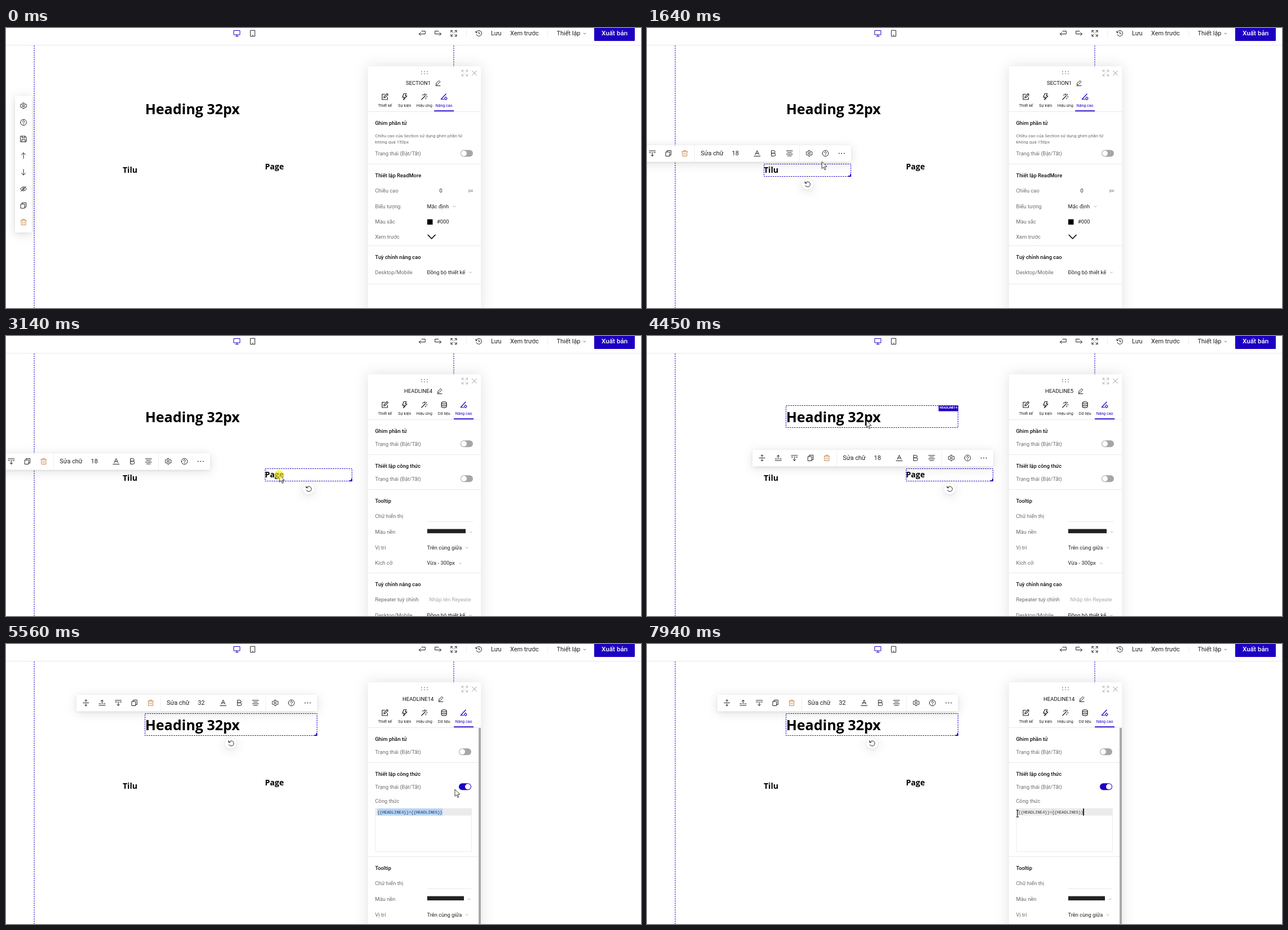
Write an HTML page that moves like this. It is 1126 px wide and 497 px high and loops after 8 s.

```html
<!DOCTYPE html>
<html lang="vi">
<head>
<meta charset="utf-8">
<title>Page builder</title>
<style>
html, body { margin: 0; width: 100%; height: 100%; overflow: hidden; background: #fff; }
svg { display: block; width: 1126px; height: 497px; font: 9.36px Roboto, sans-serif; fill: #222; }
.ico { fill: none; stroke: #222; stroke-linecap: round; stroke-linejoin: round; }
.label { fill: #6c6c6c; }
.title { font-weight: 500; fill: #111; }
.name { font-size: 9.55px; fill: #111; }
.note { font-size: 7.8px; fill: #6c6c6c; }
.tab { font-size: 7.02px; text-anchor: middle; }
.hint { fill: #aaa; }
.menu { font-size: 10.92px; }
.publish { font-size: 11.7px; font-weight: 500; fill: #fff; }
.h1 { font: 700 25px "Open Sans", sans-serif; fill: #000; }
.h2 { font: 700 14px "Open Sans", sans-serif; fill: #000; }
.tag { font-size: 5.4px; font-weight: 700; fill: #fff; text-anchor: middle; }
.code { font: 7.13px "Liberation Mono", monospace; fill: #333; }
.dash { fill: none; stroke: #1c00c2; stroke-dasharray: 2.4 1.6; }
.card { fill: #fff; filter: drop-shadow(0 1px 2px rgba(0,0,0,.08)) drop-shadow(0 3px 9px rgba(0,0,0,.12)); }
.panel { fill: #fff; filter: drop-shadow(0 0 12px rgba(0,0,0,.12)); }
</style>
</head>
<body>
<svg id="stage" viewBox="0 0 1126 497"></svg>
<script>
const LOOP = 8000, BLUE = '#1c00c2', INK = '#222', RUST = '#c98a4b', PALE = '#aaa';

const ICONS = {
  gear: 'M-1-5H1L1.5-3.4 3-2.5 4.6-3 5.6-1.3 4.4 0 5.6 1.3 4.6 3 3 2.5 1.5 3.4 1 5H-1L-1.5 3.4-3 2.5-4.6 3-5.6 1.3-4.4 0-5.6-1.3-4.6-3-3-2.5-1.5-3.4ZM-1.7 0a1.7 1.7 0 1 0 3.4 0a1.7 1.7 0 1 0-3.4 0',
  help: 'M-5.3 0a5.3 5.3 0 1 0 10.6 0a5.3 5.3 0 1 0-10.6 0M-1.7-1.2a1.7 1.7 0 1 1 2.5 1.5Q0 .7 0 1.5M0 3v.2',
  save: 'M-5-5H3L5-3V5H-5ZM-2.5-5v3h5v-3M-3 5V1H3V5',
  up: 'M0 5V-5M-3.5-1.5 0-5 3.5-1.5',
  down: 'M0-5V5M-3.5 1.5 0 5 3.5 1.5',
  hide: 'M-5.5 0Q0-7.5 5.5 0Q0 7.5-5.5 0ZM-1.6 0a1.6 1.6 0 1 0 3.2 0a1.6 1.6 0 1 0-3.2 0M-4.5 4.5 4.5-4.5',
  copy: 'M-4.5-2.5H2V5H-4.5ZM-2.5-2.5V-5H4.5V3H2',
  trash: 'M-5-3.2H5M-2-3.2V-5H2V-3.2M-4-3.2V5H4V-3.2M-1.3-.5V2.5M1.3-.5V2.5',
  spread: 'M-5 0H5M0-2V-5.3M-2-3.6 0-5.5 2-3.6M0 2V5.3M-2 3.6 0 5.5 2 3.6',
  above: 'M-5.5 4.5H5.5M-5.5 1.5H-2.5M5.5 1.5H2.5M0 2V-5M-2.3-2.7 0-5 2.3-2.7',
  below: 'M-5.5-4.5H5.5M-5.5-1.5H-2.5M5.5-1.5H2.5M0-2V5M-2.3 2.7 0 5 2.3 2.7',
  color: 'M-5.5 5H5.5M-3.5 2.5 0-5 3.5 2.5M-2.2 0H2.2',
  bold: 'M-3-4.8H.8a2.3 2.3 0 0 1 0 4.6H-3ZM-3-.2H1.4a2.5 2.5 0 0 1 0 5H-3Z',
  align: 'M-5.5-4.5H5.5M-3.5-1.5H3.5M-5.5 1.5H5.5M-3.5 4.5H3.5',
  more: 'M-4.6 0h.3M-.1 0h.3M4.4 0h.3',
  turn: 'M-4-2A4.6 4.6 0 1 1-4 2.4M-4.7-4.8V-1.8H-1.6',
  desktop: 'M-5.3-5H5.3V2.5H-5.3ZM0 2.5V5M-2.5 5.3H2.5',
  phone: 'M-3.8-5.3H3.8V5.3H-3.8ZM-.8 3.4H.8',
  undo: 'M-5.5 1.2H5.3V-4H-1M-2.7-1.6-5.5 1.2-2.7 4',
  redo: 'M5.5 1.2H-5.3V-4H1M2.7-1.6 5.5 1.2 2.7 4',
  full: 'M-5-2V-5H-2M2-5H5V-2M5 2V5H2M-2 5H-5V2M-5-5-1.5-1.5M5-5 1.5-1.5M5 5 1.5 1.5M-5 5-1.5 1.5',
  history: 'M-4.8-1.5A5 5 0 1 1-4.6 2M-5.5-4V-1.3H-2.8M0-2.5V.5H2.3',
  chev: 'M-2-1 0 1 2-1',
  bigChev: 'M-6.5-3.2 0 3.5 6.5-3.2',
  close: 'M-4-4 4 4M4-4-4 4',
  pencil: 'M-3.5 2.8-3-.2 2-4.5 4-2.5-1 2.3ZM-4 4.5H4',
  edit: 'M-.5-4.5H-5V5H4.5V1M-2 2-1.4-.4 3.7-5.5 5.5-3.7.4 1.4Z',
  bolt: 'M-1.5-5.5H3L1-1.5H4L-2 5.5-.7.8H-4Z',
  wand: 'M-5 5 1.5-1.5M1-5.3v2M-3.5-3h1.6M4-4 3-3M3.5 0H5.3M2.5 2.2v1.6M-1-4.5-.3-3.6',
  data: 'M-4.5-3.3a4.5 1.9 0 1 0 9 0a4.5 1.9 0 1 0-9 0V3.3a4.5 1.9 0 0 0 9 0V-3.3M-4.5 0a4.5 1.9 0 0 0 9 0',
  tune: 'M-5.3 4.5 3.5-5M-5.3 4.5H0M1.2 3a2 2 0 1 0 4 0a2 2 0 1 0-4 0M3.2 0v.6M3.2 5.2v.5'
};

const icon = (name, x, y, color = INK, width = 1) =>
  `<path class="ico" d="${ICONS[name]}" transform="translate(${x} ${y})" style="stroke:${color};stroke-width:${width}"/>`;
const text = (x, y, str, cls = '', extra = '') => `<text x="${x}" y="${y + 3.4}" class="${cls}" ${extra}>${str}</text>`;
const rect = (x, y, w, h, fill, extra = '') => `<rect x="${x}" y="${y}" width="${w}" height="${h}" fill="${fill}" ${extra}/>`;
const rule = (y, x = 642, w = 200) => rect(x, y, w, 1, '#e9e9e9');
// Visible during each "from-to" range, in milliseconds
const during = (ranges, body) => `<g data-on="${ranges}">${body}</g>`;

const header = rule(30, 0, 1126)
  + icon('desktop', 409.5, 9.5, BLUE) + icon('phone', 437.5, 9.5)
  + icon('undo', 738, 9.5) + icon('redo', 766, 9.5) + icon('full', 794, 9.5)
  + rect(816, 3, 1, 13, '#eee') + icon('history', 838.5, 9.5) + rect(960, 3, 1, 13, '#eee')
  + text(860, 9.3, 'Lưu', 'menu') + text(894, 9.3, 'Xem trước', 'menu')
  + text(976.5, 9.3, 'Thiết lập', 'menu') + icon('chev', 1026, 10, '#777')
  + rect(1043, -6, 72, 29, BLUE, 'rx="1"') + text(1056, 9.8, 'Xuất bản', 'publish');

const sideBar = rect(16, 120, 30, 243, '#fff', 'class="card" rx="1"')
  + ['gear', 'help', 'save', 'up', 'down', 'hide', 'copy', 'trash']
    .map((n, i) => icon(n, 31, 138 + i * 29.5, n === 'trash' ? RUST : INK)).join('');

const canvas = `<path class="dash" d="M50 31V497M794 31V497"/>`
  + text(246.7, 149.6, 'Heading 32px', 'h1')
  + text(207, 254, 'Tilu', 'h2') + text(459.3, 247.8, 'Page', 'h2');

const BOXES = {
  HEADLINE4: { x: 207.5, y: 241.5, w: 154, h: 22 },
  HEADLINE5: { x: 459.5, y: 235.5, w: 154, h: 22 },
  HEADLINE14: { x: 246.5, y: 123.5, w: 305, h: 39 }
};
const outline = ({ x, y, w, h }) => `<rect class="dash" x="${x}" y="${y}" width="${w}" height="${h}"/>`;

function hover(name) {
  const b = BOXES[name], w = name.length * 3.5, right = b.x + b.w + .5;
  return outline(b) + rect(right - w, b.y, w, 10, BLUE) + text(right - w / 2, b.y + 2.1, name, 'tag');
}

function selected(name) {
  const b = BOXES[name], cx = b.x + b.w / 2, right = b.x + b.w, low = b.y + b.h;
  return outline(b)
    + `<path d="M${right - 4.5} ${low - .5}H${right - .5}V${low - 4.5}" fill="none" stroke="${BLUE}" stroke-width="2"/>`
    + `<circle class="card" cx="${cx}" cy="${low + 13.8}" r="10"/>` + icon('turn', cx + .3, low + 13.8);
}

function toolbar(x, y, size) {
  const row = (list, from) => list.map((n, i) =>
    icon(n, from + i * 28.7, 14.5, n === 'trash' ? RUST : INK, n === 'more' ? 1.7 : 1)).join('');
  return `<g transform="translate(${x} ${y})">` + rect(0, 0, 427, 29.5, '#fff', 'class="card" rx="1"')
    + row(['spread', 'above', 'below', 'copy', 'trash'], 17)
    + rect(149, 0, 1, 29.5, '#eee') + text(160.3, 14.3, 'Sửa chữ', 'menu') + text(215.5, 14.8, size, 'menu')
    + row(['color', 'bold', 'align'], 260.3)
    + rect(335, 0, 1, 29.5, '#eee') + row(['gear', 'help', 'more'], 352.7) + '</g>';
}

const toggle = (cx, cy, on) => rect(cx - 11, cy - 6, 22, 12, on ? BLUE : '#a6a6a6', 'rx="6"')
  + `<circle cx="${cx + (on ? 5 : -5)}" cy="${cy}" r="5" fill="#fff"/>`;
const heading = (y, str) => text(654.5, y, str, 'title');
const label = (y, str) => text(654.5, y, str, 'label');
const value = (y, str, chevX) => text(746.5, y, str) + icon('chev', chevX, y + .7, '#999', .8);

function tabs(list) {
  const last = list.length - 1;
  return list.map(([n, str], i) => {
    const x = 672 + i * 34.9, color = i === last ? BLUE : INK;
    return icon(n, x, 122, color, 1.2) + text(x, 136.2, str, 'tab', `style="fill:${color}"`);
  }).join('') + rule(148) + rect(654.5 + last * 34.9, 146.3, 35, 1.7, BLUE);
}
const TABS = [['edit', 'Thiết kế'], ['bolt', 'Sự kiện'], ['wand', 'Hiệu ứng'], ['data', 'Dữ liệu'], ['tune', 'Nâng cao']];

const name = (x, str, penX) => text(x, 97.8, str, 'name') + icon('pencil', penX, 98);

const panelFrame = rect(642, 68, 200, 440, '#fff', 'class="panel" rx="1"')
  + [737, 742, 747].map(x => rect(x - .9, 76.3, 1.8, 1.8, '#999') + rect(x - .9, 80.3, 1.8, 1.8, '#999')).join('')
  + icon('full', 813.5, 80, PALE, .9) + icon('close', 830.5, 80, '#999');

const sectionPanel = name(709, 'SECTION1', 766) + tabs(TABS.filter(t => t[0] !== 'data'))
  + heading(169, 'Ghim phần tử')
  + text(654.5, 190.7, 'Chiều cao của Section sử dụng ghim phần tử', 'note') + text(654.5, 201.5, 'không quá 150px', 'note')
  + label(222.5, 'Trạng thái (Bật/Tắt)') + toggle(817, 222.5) + rule(241)
  + heading(262, 'Thiết lập ReadMore')
  + label(288.3, 'Chiều cao') + text(768.5, 289, '0') + text(820, 288, 'px', 'note')
  + label(316.2, 'Biểu tượng') + value(316.2, 'Mặc định', 795)
  + label(344, 'Màu sắc') + rect(747, 339.5, 9.5, 9.5, '#000') + text(764, 344, '#000')
  + label(370.5, 'Xem trước') + icon('bigChev', 754.7, 370.5, '#000', 1.6) + rule(386)
  + heading(407, 'Tuỳ chỉnh nâng cao')
  + label(433.3, 'Desktop/Mobile') + value(433.3, 'Đồng bộ thiết kế', 823.5) + rule(454);

const topRows = x => heading(169, 'Ghim phần tử') + label(191.3, 'Trạng thái (Bật/Tắt)') + toggle(x, 191.3) + rule(210)
  + heading(231, 'Thiết lập công thức') + label(253.3, 'Trạng thái (Bật/Tắt)');

const tooltipRows = (y, right) => heading(y, 'Tooltip')
  + label(y + 26.3, 'Chữ hiển thị') + rule(y + 35.7, 747, right - 747)
  + label(y + 54.2, 'Màu nền') + rect(747, y + 49.6, right - 760, 7.5, '#222') + icon('chev', right - 4, y + 55, '#999', .8)
  + label(y + 82.2, 'Vị trí') + value(y + 82.2, 'Trên cùng giữa', 817)
  + label(y + 110, 'Kích cỡ') + value(y + 110, 'Vừa - 300px', 805.5);

const textPanel = tabs(TABS) + topRows(817) + toggle(817, 253.3) + rule(272) + tooltipRows(293, 828)
  + rule(420) + heading(441, 'Tuỳ chỉnh nâng cao')
  + label(467.7, 'Repeater tuỳ chỉnh') + text(750.5, 467.7, 'Nhập tên Repeate', 'hint')
  + label(495.3, 'Desktop/Mobile') + value(495.3, 'Đồng bộ thiết kế', 823.5);

const formulaPanel = name(703, 'HEADLINE14', 771) + tabs(TABS) + topRows(814) + toggle(814, 253.3, true)
  + label(278.3, 'Công thức') + rect(655, 292, 170.5, 76.5, '#fff', 'stroke="#ececec"')
  + rect(655, 292, 170.5, 12.5, '#ebebeb')
  + during('4860-6390', rect(658.3, 292, 116, 12.5, '#b4d4fb'))
  + rect(718.4, 294, 4, 9, 'none', 'stroke="#c4c8cc" stroke-width=".7"')
  + text(658.4, 297.4, '{{HEADLINE4}}={{HEADLINE5}}', 'code')
  + during('6390-6930 7460-8000', rect(773.2, 292, 1.7, 12.5, '#000'))
  + rule(377) + tooltipRows(398, 825) + rect(838, 149, 4, 348, '#a9a9a9');

const tabHover = rect(726, 113, 31, 30, '#fff') + icon('wand', 741.8, 122, BLUE, 1.2)
  + text(741.8, 136.2, 'Hiệu ứng', 'tab', `style="fill:${BLUE}"`);

const CURSORS = {
  arrow: '<path d="M0 0V12.3L2.9 9.7 4.9 14.5 6.9 13.6 4.9 8.9H8.8Z" fill="#fff" stroke="#222" stroke-width=".9"/>',
  hand: '<path d="M-1.3 1Q0-.8 1.3 1V6.2L3.7 6.7 6 7.4 8 8.6V12Q8 15 6.3 17.5H-.8Q-2.5 13.5-5 10.8-5 8.8-3 9.6L-1.3 11Z" fill="#fff" stroke="#222" stroke-width=".9" stroke-linejoin="round"/>',
  beam: '<path d="M-2.5-6H-.7L0-5.4.7-6H2.5M0-5.4V5.4M-2.5 6H-.7L0 5.4.7 6H2.5" fill="none" stroke="#111" stroke-width="1.2"/>'
};

document.getElementById('stage').innerHTML = canvas + header
  + during('0-1500', sideBar)
  + during('860-985 4280-4580', hover('HEADLINE14'))
  + during('1160-1500', hover('HEADLINE4')) + during('3000-3060', hover('HEADLINE5'))
  + during('1500-3060', selected('HEADLINE4'))
  + during('3060-4580', selected('HEADLINE5'))
  + during('4580-8000', selected('HEADLINE14'))
  + during('1640-3335', toolbar(-65, 208, 18))
  + during('3335-4780', toolbar(187, 202, 18))
  + during('4780-8000', toolbar(124.7, 90, 32))
  + panelFrame
  + during('0-1780', sectionPanel)
  + during('1780-4860', textPanel)
  + during('1780-3410', name(706, 'HEADLINE4', 769))
  + during('3410-4860', name(706, 'HEADLINE5', 769))
  + during('1920-2090', tabHover)
  + during('4860-8000', formulaPanel)
  + '<g id="pointer">'
  + during('330-1920 2090-3380 3560-5950', CURSORS.arrow)
  + during('1920-2090 3380-3560', CURSORS.hand)
  + during('5950-8000', CURSORS.beam)
  + during('1500-1640 3060-3268 4580-4700 6380-6455', '<circle cx="-1" cy="-1" r="8.3" fill="#f5ee1c" opacity=".65"/>')
  + '</g>';

// Pointer path: time, x, y
const PATH = [
  [330, 1098, 482], [470, 930, 330], [600, 780, 190], [720, 640, 81], [820, 500, 115], [900, 400, 145],
  [1025, 312, 206], [1085, 312, 206], [1095, 270, 235], [1300, 226, 252], [1570, 226, 252],
  [1700, 380, 225], [1850, 620, 155], [1985, 755, 113], [2060, 755, 113], [2200, 752, 101], [2330, 751, 100],
  [2590, 751, 100], [2850, 600, 190], [3060, 485, 247], [3268, 485, 247], [3340, 664, 178], [3480, 795, 115],
  [3680, 759, 98], [3830, 758, 98], [4030, 758, 98], [4160, 690, 110], [4310, 500, 138], [4445, 389, 150],
  [4650, 389, 150], [4790, 487, 155], [4930, 580, 190], [5200, 740, 240], [5400, 810, 250], [5555, 796, 258],
  [5625, 796, 258], [5850, 786, 285], [6300, 783, 301], [6650, 783, 301], [7070, 665, 300], [7400, 665, 300],
  [7610, 657, 308], [7870, 657, 308], [7935, 657, 301]
];

const pointer = document.getElementById('pointer');
const timed = [...document.querySelectorAll('[data-on]')].map(el => ({
  el, ranges: el.dataset.on.split(' ').map(r => r.split('-').map(Number))
}));

function pointAt(t) {
  const next = PATH.findIndex(p => p[0] > t);
  if (next < 1) return PATH[next ? PATH.length - 1 : 0].slice(1);
  const [t0, x0, y0] = PATH[next - 1], [t1, x1, y1] = PATH[next];
  const k = (t - t0) / (t1 - t0);
  return [x0 + (x1 - x0) * k, y0 + (y1 - y0) * k];
}

function draw(now) {
  const t = now % LOOP;
  for (const { el, ranges } of timed)
    el.style.display = ranges.some(([a, b]) => t >= a && t < b) ? '' : 'none';
  pointer.setAttribute('transform', `translate(${pointAt(t)})`);
}

const start = performance.now();
function tick() {
  draw(performance.now() - start);
  requestAnimationFrame(tick);
}
tick();
</script>
</body>
</html>
```
